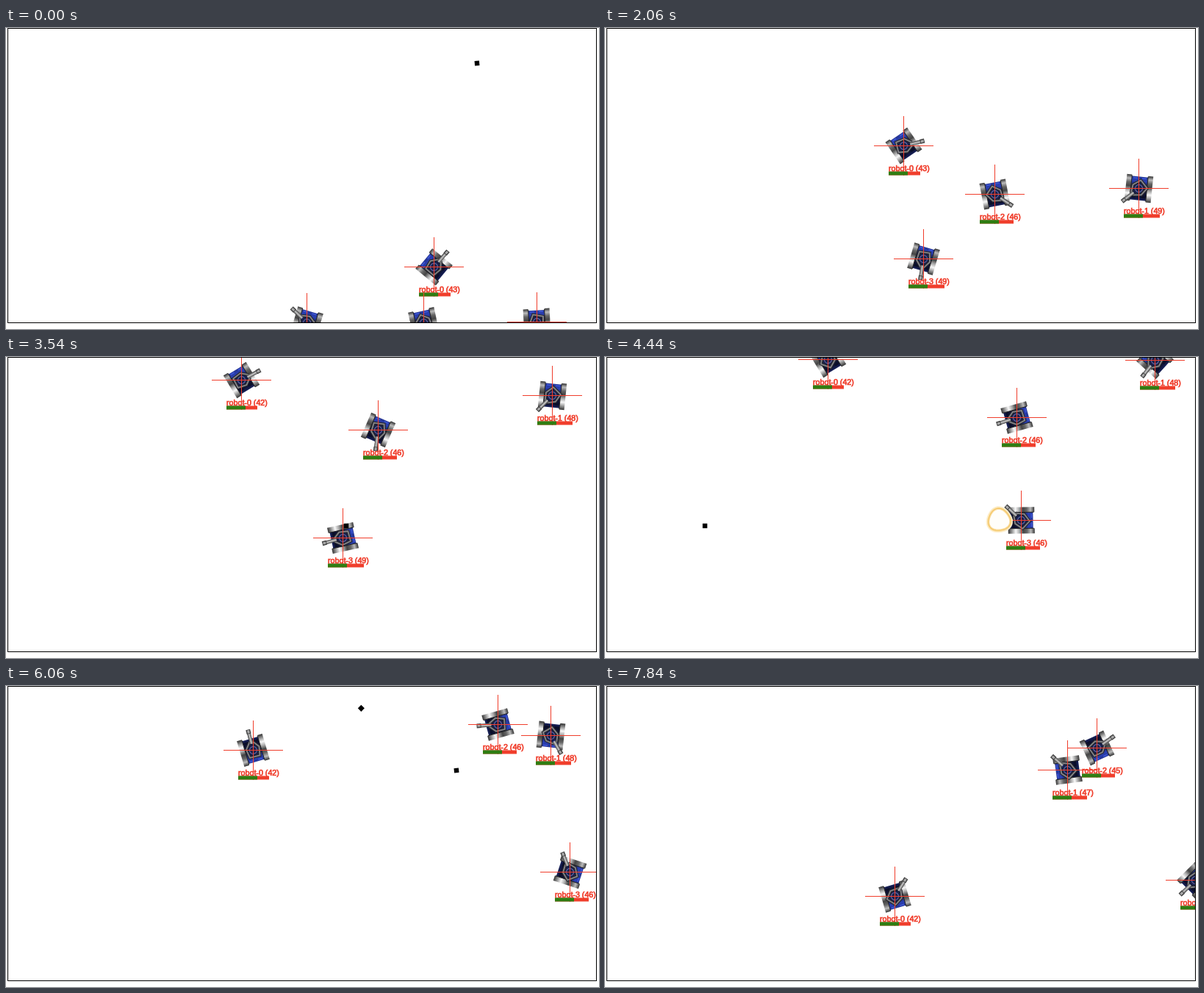
An HTML page with a canvas that plays this animation: 807 by 410 pixels, repeating every 7990 ms.

```html
<!DOCTYPE html>
<html lang="en">
<head>
<meta charset="utf-8">
<title>Robot arena</title>
<style>
  html, body { margin: 0; width: 100%; height: 100%; overflow: hidden; background: #fff; }
  canvas { display: block; }
</style>
</head>
<body>
<canvas id="stage" width="807" height="410"></canvas>
<script>
const ctx = document.getElementById('stage').getContext('2d');
const LOOP = 7990, STEPS = 54, BULLET_SPEED = 54.5;
const RED = '#f03e2c', GREEN = '#2f7d12';
const rad = degrees => degrees * Math.PI / 180;

// Waypoints are [step, x, y, heading]; a missing heading follows the drive direction.
// Each hit costs one point of energy; aim is the gun heading at AIM_STEPS.
const AIM_STEPS = [0, 9, 18, 30, 37, 46, 53];
const robots = [
  {
    energy: 43, hits: [24], aim: [41, 41, 104, 20, -52, 32, 32],
    path: [[0, 582, 325], [9, 449, 214], [18, 371, 116], [26, 303, 3], [30, 303, 3],
           [37, 316, 23], [46, 360, 168], [53, 394, 286]]
  },
  {
    energy: 49, hits: [24, 42], aim: [190, 232, 232, 218, 98, 216, 312],
    path: [[0, 722, 400], [3, 722, 400], [9, 717, 301], [18, 733, 151], [27, 748, 3],
           [37, 748, 7], [43, 738, 97], [46, 732, 100], [53, 629, 114]]
  },
  {
    energy: 46, hits: [42], aim: [120, 124, 123, 252, 252, 284, 415],
    path: [[0, 568, 401], [3, 568, 401], [9, 548, 308], [18, 516, 160], [22, 506, 99],
           [27, 506, 99], [30, 560, 82], [37, 682, 48], [46, 652, 57], [53, 669, 84, 155]]
  },
  {
    energy: 49, hits: [28, 28, 28], aim: [-46, 180, 196, 313, 330, 350, 226],
    path: [[0, 409, 401], [9, 410, 394], [18, 452, 250], [24, 458, 246], [30, 566, 222],
           [37, 674, 220], [40, 749, 247], [43, 803, 265], [53, 803, 264, 45]]
  }
];

// Bullets fly straight from where they were fired until they leave the arena.
const bullets = [
  { fired: 0, x: 641, y: 48, heading: -5 },
  { fired: 24, x: 463, y: 230, heading: -90 },
  { fired: 37, x: 637.5, y: 184.5, heading: -45 },
  { fired: 37, x: 758, y: 3, heading: 0 },
  { fired: 41, x: 613, y: 115, heading: -96.5 },
  { fired: 46, x: 728, y: 117, heading: 193 }
];

const blast = { x: 536.5, y: 222, from: 28, to: 31 };

// Short moves and waits keep the previous heading; turns take the shorter way round.
function addHeadings(path) {
  const legs = path.map(([, x, y, fixed], i) => {
    const [, nx, ny] = path[i + 1] || path[i];
    const far = Math.hypot(nx - x, ny - y) > 40;
    return fixed ?? (far ? Math.atan2(nx - x, y - ny) * 180 / Math.PI : null);
  });
  let heading = legs.find(h => h !== null);
  return path.map(([step, x, y], i) => {
    const turn = (legs[i] ?? heading) - heading;
    heading += turn - 360 * Math.round(turn / 360);
    return [step, x, y, heading];
  });
}

for (const robot of robots) {
  robot.path = addHeadings(robot.path);
  robot.aim = robot.aim.map((angle, i) => [AIM_STEPS[i], angle]);
}

function sample(rows, step) {
  const i = Math.max(1, rows.findIndex(row => row[0] >= step));
  const a = rows[i - 1], b = rows[i], k = (step - a[0]) / (b[0] - a[0]);
  return a.slice(1).map((v, j) => v + (b[j + 1] - v) * k);
}

function box(color, x, y, w, h) {
  ctx.fillStyle = color;
  ctx.fillRect(x, y, w, h);
}

function line(color, width, ...points) {
  ctx.strokeStyle = color;
  ctx.lineWidth = width;
  ctx.beginPath();
  points.forEach(([x, y]) => ctx.lineTo(x, y));
  ctx.stroke();
}

function turned(x, y, degrees, draw) {
  ctx.save();
  ctx.translate(x, y);
  ctx.rotate(rad(degrees));
  draw();
  ctx.restore();
}

function ramp(x0, y0, x1, y1, ...colors) {
  const g = ctx.createLinearGradient(x0, y0, x1, y1);
  colors.forEach((c, i) => g.addColorStop(i / (colors.length - 1), c));
  return g;
}

const tread = ramp(0, -18, 0, 18, '#333', '#bbb', '#666', '#444', '#aaa', '#f8f8f8', '#999', '#333');
const hull = ramp(0, -17, 0, 17, '#22308a', '#2a40b4', '#18225e', '#0e1438', '#0c1030', '#18225e');
const barrel = ramp(-2.5, 0, 2.5, 0, '#333', '#ccc', '#444');

function drawBody() {
  box(hull, -12, -16, 24, 32);
  for (const side of [-1, 1]) {
    box('#3c54d0', side * 6 - 3, -15, 6, 2);
    box('#0a0e28', side * 7 - 3, 10, 6, 3);
    box(tread, side * 14.5 - 3.5, -18, 7, 36);
    box('#222', side * 11 - .5, -17, 1, 34);
  }
}

function drawGun() {
  box('#1a2048', -7, -8, 14, 16);
  const shell = [[-2, -12], [-9, -3], [-7, 9], [7, 9], [9, -3], [2, -12]];
  line('#26262c', 4, ...shell);
  line('#85858a', 1.8, ...shell);
  box(barrel, -2.5, -25, 5, 16);
  box('#444', -3, -29, 6, 6);
  box('#aaa', -1.5, -28, 3, 4);
  ctx.beginPath();
  ctx.arc(0, 0, 5, 0, 7);
  ctx.strokeStyle = '#6a70b4';
  ctx.lineWidth = 1;
  ctx.stroke();
}

function drawRobot({ path, aim, energy, hits }, id, step) {
  const [px, py, heading] = sample(path, step);
  const x = Math.round(px), y = Math.round(py);
  const power = energy - hits.filter(hit => hit <= step).length;
  turned(x + .5, y + .5, heading, drawBody);
  turned(x + .5, y + .5, sample(aim, step)[0], drawGun);
  line(RED, 1, [x - 40, y + .5], [x + 41, y + .5]);
  line(RED, 1, [x + .5, y - 40], [x + .5, y + 41]);

  const label = `robot-${id} (${power})`;
  ctx.font = '10.7px "Liberation Sans", Arial, sans-serif';
  ctx.fillStyle = ctx.strokeStyle = RED;
  ctx.lineWidth = .7;
  ctx.fillText(label, x - 20, y + 35);
  ctx.strokeText(label, x - 20, y + 35);
  box(RED, x - 20, y + 35.5, power, 5);
  box(GREEN, x - 20, y + 35.5, 26, 5);
}

function drawBullet({ fired, x, y, heading }, step) {
  if (step < fired) return;
  const way = BULLET_SPEED * (step - fired), a = rad(heading);
  turned(x + way * Math.sin(a), y - way * Math.cos(a), heading,
    () => box('#000', -3.2, -3.2, 6.4, 6.4));
}

function drawBlast({ x, y, from, to }, step) {
  if (step < from || step >= to) return;
  const radius = 5 + 5 * (step - from);
  const ring = Array.from({ length: 42 }, (_, i) => {
    const a = i * Math.PI / 20;
    const r = radius * (1 + .06 * Math.sin(3 * a + .4));
    return [x + r * Math.cos(a), y + r * Math.sin(a)];
  });
  line('#fdf0d2', 6, ...ring);
  ctx.fillStyle = '#fffefa';
  ctx.fill();
  line('#fbe0a6', 3.5, ...ring);
  line('#f3c566', 1.2, ...ring);
}

function render(time) {
  const step = Math.min(STEPS - 1, Math.floor(time / LOOP * STEPS + .12));
  box('#fff', 0, 0, 807, 410);
  ctx.save();
  ctx.beginPath();
  ctx.rect(3, 1, 800, 400);
  ctx.clip();
  robots.forEach((robot, id) => drawRobot(robot, id, step));
  bullets.forEach(bullet => drawBullet(bullet, step));
  drawBlast(blast, step);
  ctx.restore();
  ctx.strokeStyle = '#000';
  ctx.lineWidth = 1;
  ctx.strokeRect(2.5, .5, 801, 401);
}

const start = performance.now();
function tick() {
  render((performance.now() - start) % LOOP);
  requestAnimationFrame(tick);
}
tick();
</script>
</body>
</html>
```
